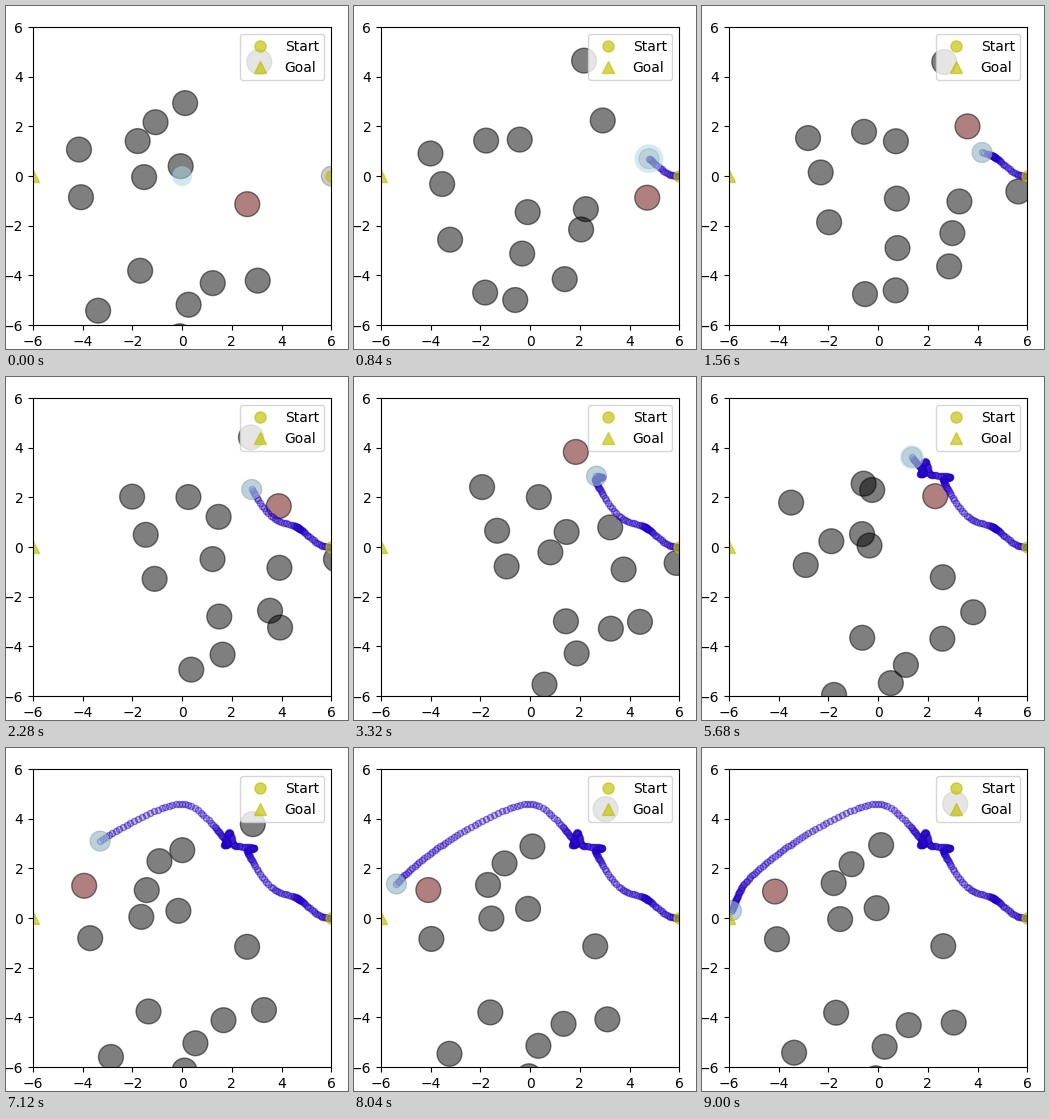
Write a matplotlib script that moves like this. It is 342x343 px and loops after 9.44 s.

```python
import numpy as np
import matplotlib.pyplot as plt
from matplotlib.animation import FuncAnimation
from matplotlib.patches import Circle

W, H, DPI = 342, 343, 100
FRAMES, INTERVAL = 236, 40
LAST = 225                       # the run ends here, then the picture holds
SPREAD, GATHER = 21, 109         # moments of the first two crowd formations
DARK, NEAR = (0, 0, 0, 0.5), (0.39, 0, 0, 0.5)

# Each walker: a point when spread out, when gathered, and at rest
WALKERS = np.reshape([
    2.17, 4.65, -.12, 2.92, -1.07, 2.17,
    2.92, 2.24, 1.53, -.38, 3.1, 4.6,
    -1.77, 1.43, -.58, 1.69, .12, 2.94,
    -.42, 1.47, .44, -.32, -1.79, 1.41,
    -4.01, .91, -2.88, 2.48, -4.15, 1.07,
    -3.54, -.32, -2.22, .5, -1.53, -.04,
    -.1, -1.45, -.62, -.26, -.06, .4,
    2.24, -1.33, 2.58, -1.29, 2.62, -1.13,
    2.05, -2.15, 1.93, -4.33, .26, -5.18,
    4.71, -.87, 4.57, -1.11, 3.04, -4.21,
    -3.22, -2.56, -1.81, -.6, -4.07, -.85,
    -.32, -3.12, .36, -3.5, -1.69, -3.81,
    -1.81, -4.69, -.24, -6.46, -3.38, -5.42,
    -.6, -4.99, 1.09, -4.55, -.1, -6.45,
    1.39, -4.15, 3.87, -3.1, 1.23, -4.31], (15, 3, 2))

# Robot route: step, x, y
ROUTE = np.array([
    (1, 6, 0), (6, 5.7, .04), (21, 4.78, .7), (34, 4.55, .85), (43, 3.8, 1.08),
    (57, 2.8, 2.32), (66, 2.62, 2.72), (77, 2.88, 2.82), (93, 2.1, 2.93),
    (105, 1.9, 3.45), (118, 1.7, 2.95), (126, 1.84, 2.98), (142, 1.36, 3.62),
    (155, 0, 4.6), (178, -3.3, 3.1), (204, -5.5, 1.2), (225, -5.9, .3)])


def track(t, v, at):
    """Smooth interpolation that never overshoots its key points."""
    h = np.diff(t)
    d = np.diff(v) / h
    a, b = d[:-1], d[1:]
    same = a * b > 0
    inner = np.where(same, 2 * a * b / np.where(same, a + b, 1), 0)
    m = np.concatenate([d[:1], inner, d[-1:]])
    i = np.clip(np.searchsorted(t, at, side="right") - 1, 0, len(h) - 1)
    u, w = (at - t[i]) / h[i], h[i]
    return ((2 * u**3 - 3 * u**2 + 1) * v[i] + (u**3 - 2 * u**2 + u) * w * m[i]
            + (3 * u**2 - 2 * u**3) * v[i + 1] + (u**3 - u**2) * w * m[i + 1])


def crowd(n):
    """The crowd swings right while gathering, then eases out to rest."""
    spread, gather, rest = WALKERS.swapaxes(0, 1)
    if n == 0:
        return rest
    if n <= GATHER:
        s = (n - SPREAD) / (GATHER - SPREAD)
        swing = np.sin(np.pi * max(s, 0))
        return spread + (gather - spread) * s + swing * np.array([1.6, 0.5])
    s = (n - GATHER) / (LAST - GATHER)
    return rest + (gather - rest) * (1 - s) ** 2


def reach(n):
    """Halo radius: it swells while the robot waits for people to pass."""
    pulse = lambda centre: np.exp(-((n - centre) / 12) ** 2)
    return 0.4 + 0.18 * pulse(21) + 0.08 * pulse(142)


steps = np.arange(1, LAST + 1)
path = np.column_stack([track(ROUTE[:, 0], ROUTE[:, k], steps) for k in (1, 2)])

fig = plt.figure(figsize=(W / DPI, H / DPI), dpi=DPI, facecolor="white")
ax = fig.add_axes([27 / W, 23.9 / H, 298.3 / W, 298 / H])
ax.set(xlim=(-6, 6), ylim=(-6, 6),
       xticks=range(-6, 7, 2), yticks=range(-6, 7, 2))

people = [ax.add_patch(Circle(p, 0.5, zorder=1)) for p in crowd(0)]
trail = ax.scatter([], [], s=19, facecolor=(0.3, 0.1, 0.7, 0.25),
                   edgecolor=(0.1, 0, 0.8, 0.5), linewidths=1, zorder=1.5)
body = ax.add_patch(Circle((6, 0), 0.4, color=(0, 0, 0, 0.2), zorder=2))
halo = ax.add_patch(Circle((0, 0), 0.4, color="lightblue", alpha=0.55,
                           linewidth=0, zorder=2.1))
for x, marker, label in ((6, "o", "Start"), (-6, "^", "Goal")):
    ax.plot(x, 0, marker, color="y", ms=8, alpha=0.65, label=label, zorder=2.4)
ax.legend(loc="upper right")


def draw(frame):
    n = min(frame, LAST)
    spot = path[max(n - 1, 0)]
    body.center = tuple(spot)
    halo.center = tuple(spot) if n else (0, 0)
    halo.set_radius(reach(n) if n else 0.4)
    trail.set_offsets(path[:n])
    places = crowd(n)
    nearest = np.argmin(np.hypot(*(places - spot).T))
    for i, (person, place) in enumerate(zip(people, places)):
        person.center = tuple(place)
        person.set_facecolor(NEAR if i == nearest else DARK)
        person.set_edgecolor(DARK)
    return [*people, trail, body, halo]


def reset():
    return draw(0)


anim = FuncAnimation(fig, draw, frames=FRAMES, init_func=reset,
                     interval=INTERVAL, repeat=True, repeat_delay=0, blit=False)
plt.show()
```
